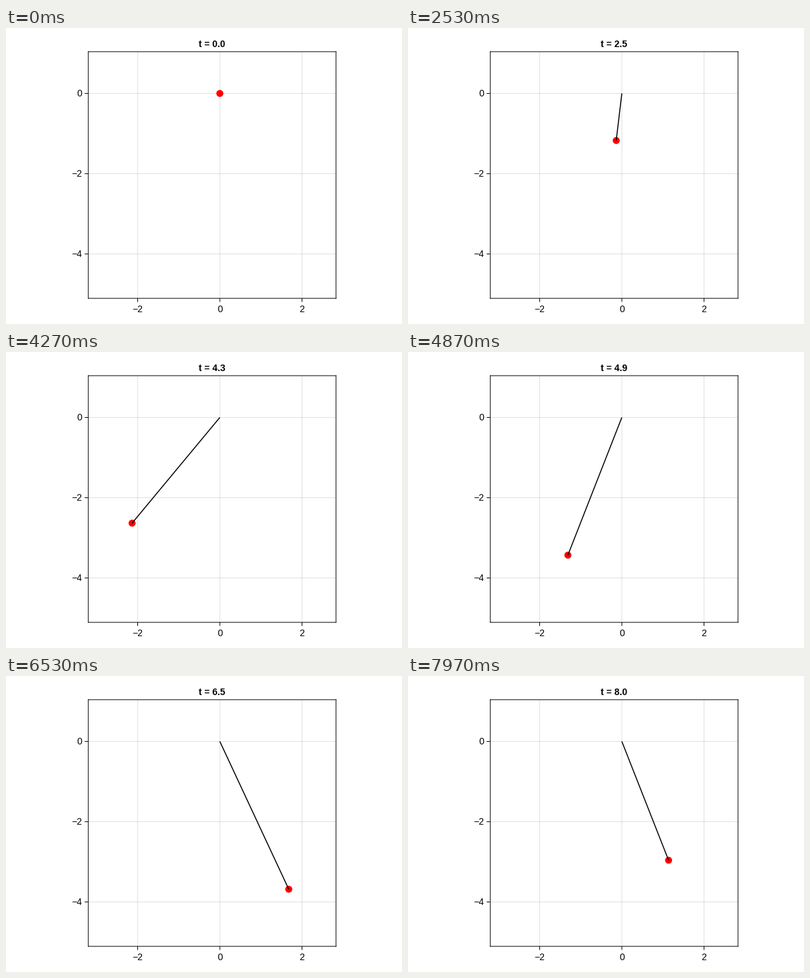
Animation of 600 by 450 pixels, one loop 8 s. Source, as a matplotlib script:

```python
import numpy as np
import matplotlib.pyplot as plt
from matplotlib.animation import FuncAnimation
from matplotlib.patches import Circle

W, H, DPI = 600, 450, 100
LOOP, TICK, FPS = 8000, 20, 30     # ms, ms, motion steps per second
PX = 72 / DPI                      # one pixel in points
LEFT, RIGHT, TOP, BOTTOM = 124.7, 500, 36, 411
ORIGIN = np.array([324, 99.5])
SCALE = np.array([62.25, -61])

plt.rcParams["font.family"] = "Liberation Sans"

# places the bob passes, evenly spaced in time over the loop
PLACES = np.array([
    (0, 0), (0.60, -0.30), (0.845, -0.98), (0.57, -1.26), (-0.36, -1.155),
    (-1.52, -1.375), (-2.205, -2.22), (-1.67, -3.205), (-0.315, -3.78),
    (1.04, -3.87), (1.76, -3.607), (1.725, -3.165), (1.10, -2.96)])
START_V, END_V = (1.2, 0.3), (-1.13, 0)
STEP = LOOP / 1000 / (len(PLACES) - 1)


def spline_speeds(p):
    """Speeds at the places that make the path a smooth cubic spline."""
    n = len(p)
    a = 4 * np.eye(n) + np.eye(n, k=1) + np.eye(n, k=-1)
    a[0], a[-1] = np.eye(n)[0], np.eye(n)[-1]
    inner = 3 * (p[2:] - p[:-2]) / STEP
    return np.linalg.solve(a, np.vstack([START_V, inner, END_V]))


SPEEDS = spline_speeds(PLACES)


def bob(t):
    k = min(int(t / STEP), len(PLACES) - 2)
    s = t / STEP - k
    rise = s * s * (3 - 2 * s)
    bend = (1 - s) * SPEEDS[k] - s * SPEEDS[k + 1]
    return (PLACES[k] * (1 - rise) + PLACES[k + 1] * rise
            + STEP * s * (1 - s) * bend)


def to_px(point):
    return ORIGIN + SCALE * point


fig = plt.figure(figsize=(W / DPI, H / DPI), dpi=DPI, facecolor="white")
ax = fig.add_axes([0, 0, 1, 1])
ax.set_xlim(0, W)
ax.set_ylim(H, 0)
ax.axis("off")


def line(xs, ys, width=1, **style):
    return ax.plot(xs, ys, color="black", linewidth=width * PX, snap=False,
                   solid_capstyle="butt", **style)[0]


def label(x, y, text, **style):
    return ax.text(x, y, text, fontsize=14 * PX, va="baseline", **style)


def number(v):
    return str(v).replace("-", "\u2212")


for v in (-2, 0, 2):
    x = to_px((v, 0))[0]
    line([x, x], [TOP, BOTTOM], alpha=0.12)
    line([x, x], [BOTTOM, BOTTOM + 5.5])
    label(x, 432, number(v), ha="center")
for v in (-4, -2, 0):
    y = to_px((0, v))[1]
    line([LEFT, RIGHT], [y, y], alpha=0.12)
    line([LEFT - 5.5, LEFT], [y, y])
    label(114.8, y + 5, number(v), ha="right")
for x in (LEFT, RIGHT):
    line([x, x], [TOP - 0.5, BOTTOM + 0.5])
for y in (TOP, BOTTOM):
    line([LEFT - 0.5, RIGHT + 0.5], [y, y])

title = label(312.5, 29, "", ha="center", weight="bold")
dot = ax.add_patch(Circle(ORIGIN, 5.3, color="red", linewidth=0, zorder=3))
rod = line([], [], width=1.5, zorder=4)


def update(i):
    # hold the nearest motion step during each tick
    step = round((i + 0.5) * TICK / 1000 * FPS)
    t = min(step, LOOP * FPS // 1000 - 1) / FPS
    x, y = to_px(bob(t))
    dot.center = x, y
    rod.set_data([ORIGIN[0], x], [ORIGIN[1], y])
    title.set_text(f"t = {t:.1f}")
    return dot, rod, title


anim = FuncAnimation(fig, update, frames=LOOP // TICK, interval=TICK,
                     repeat=True, repeat_delay=0, blit=False)
plt.show()
```
